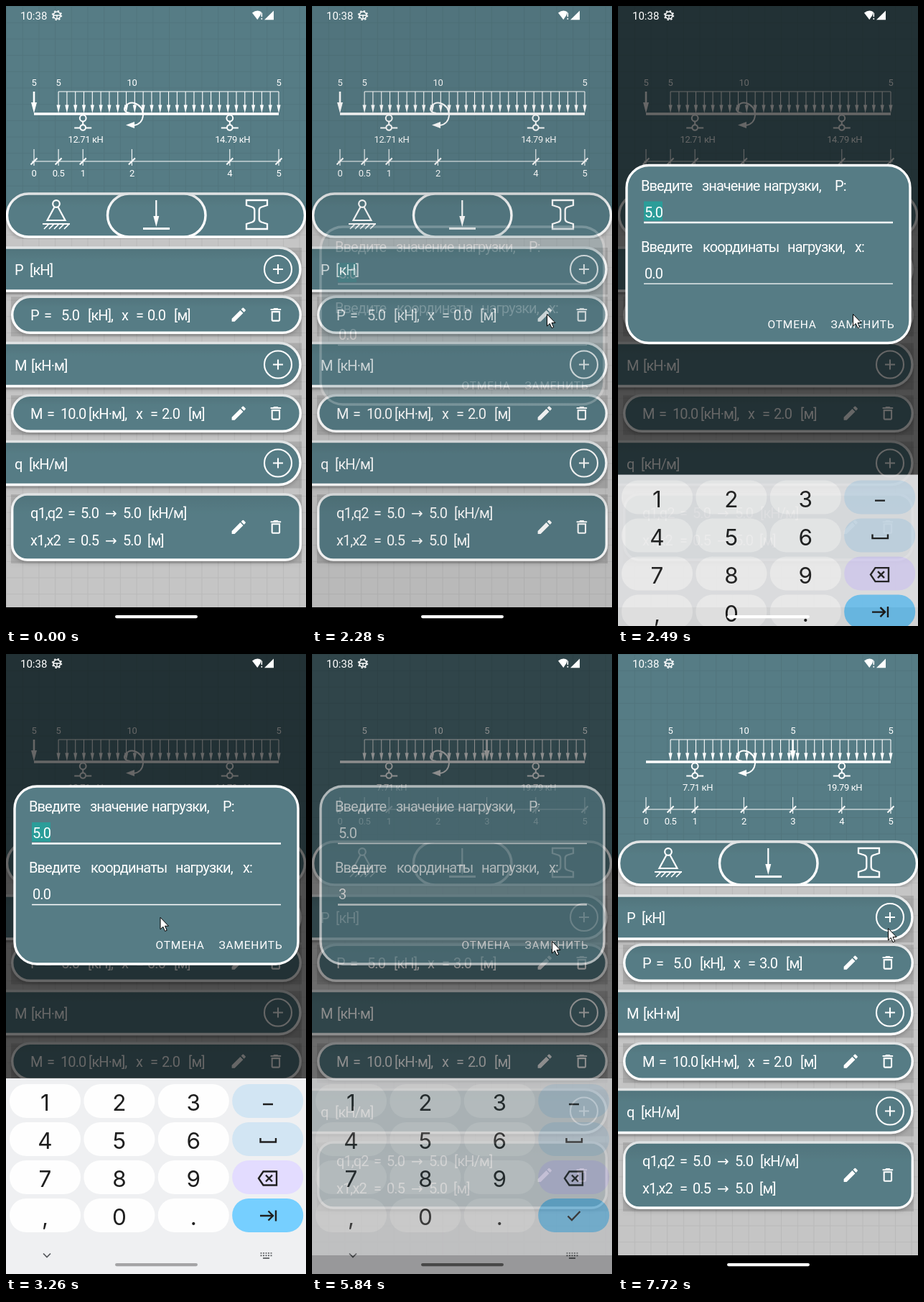
An HTML page for the animation above (8 s loop, 418x862 px).

```html
<!DOCTYPE html>
<html lang="ru">
<head>
<meta charset="utf-8">
<title>Beam load editor</title>
<style>
  html, body { margin: 0; width: 100%; height: 100%; overflow: hidden; background: #000; }
  svg { display: block; width: 100vw; height: 100vh; }
  text { font-family: Roboto, "Open Sans", "DejaVu Sans", sans-serif; fill: #fff; }
  .clock { font-size: 15px; }
  .row { font-size: 20px; letter-spacing: -.9px; }
  .small { font-size: 13px; letter-spacing: -.4px; text-anchor: middle; }
  .button { font-size: 15.5px; letter-spacing: .8px; }
  .digit { font-family: Inter, Roboto, sans-serif; font-size: 31.5px; text-anchor: middle; fill: #1f1f1f; }
  .line { fill: none; stroke: #fff; }
  .dark { fill: none; stroke: #1f1f1f; stroke-width: 2.4; }
</style>
</head>
<body>
<svg id="stage" viewBox="0 0 418 862" preserveAspectRatio="none"></svg>
<script>
const LOOP = 8000;
const TEAL = '#567c85';
const stage = document.getElementById('stage');
const list = (n, fn) => Array.from({ length: n }, (_, i) => fn(i)).join('');
const beamX = u => 39 + 68.2 * u;

const line = (d, w = 2) => `<path class="line" stroke-width="${w}" d="${d}"/>`;
const solid = d => `<path fill="#fff" d="${d}"/>`;
const ring = (x, y, r, w = 2) => `<circle class="line" cx="${x}" cy="${y}" r="${r}" stroke-width="${w}"/>`;
const text = (cls, x, y, s, id = '') => `<text class="${cls}" x="${x}" y="${y}" ${id && `id="${id}"`}>${s}</text>`;
const words = (y, s, xs) => s.split(' ').map((w, i) => text('row', xs[i], y, w)).join('');
const panel = (x, y, w, h, r) =>
  `<rect x="${x}" y="${y}" width="${w}" height="${h}" rx="${r}" fill="url(#face)" stroke="url(#rim)" stroke-width="3.4"/>`;
const shadow = (x, y, h) => `<rect x="${x}" y="${y}" width="${412 - x}" height="${h + 5}" fill="#000" opacity=".12"/>`;

// Beam drawing
const tick = u => {
  const x = beamX(u);
  return line(`M${x} 199V222`, 1.1) + line(`M${x - 4.5} 220.5L${x + 4.5} 211.5`, 2) + text('small', x, 237, u);
};
const loadArrow = i => {
  const x = 73.1 + i * 306.9 / 26;
  return line(`M${x} 119V140`, 1.1) + solid(`M${x - 2.6} 137.5h5.2L${x} 149z`);
};
const support = x => ring(x, 156, 4.4) + line(`M${x} 160.5V165`) + ring(x, 169, 3.8) +
  line(`M${x - 12} 169.5h8M${x + 4} 169.5h8`, 2.2);
const beam = `
  ${line('M73.1 119H380', 1.2)}${list(27, loadArrow)}
  ${line('M39 150H380', 3.6)}
  ${support(beamX(1))}${support(beamX(4))}
  ${line('M173 149Q162 147 166 140Q171 133 179 135Q191 139 191 152Q190 164 178 166', 1.9)}
  ${solid('M167 165.5L179 161V170z')}
  ${text('small', 73, 111, 5)}${text('small', 175.4, 111, 10)}${text('small', 380, 111, 5)}
  <g id="force">${line('M0 119V140', 2.6)}${solid('M-4 134h8L0 149z')}${text('small', 0, 111, 5)}</g>
  ${text('small', 111, 190, '', 'leftR')}${text('small', 315.7, 190, '', 'rightR')}
  ${line('M36 216H383', 1.2)}${[0, .5, 1, 2, 4, 5].map(tick).join('')}
  <g id="tick3">${tick(3)}</g>`;

// Tabs and lists
const tabs = `
  ${panel(1.5, 261, 415, 60, 30)}${panel(141.5, 261, 136.5, 60, 30)}
  ${ring(70, 275, 4.8, 2.2)}
  ${line('M67.5 279.5L57.5 298H82.5L72.5 279.5', 2.2)}${line('M51 303H89', 2.2)}
  ${line([0, 1, 2, 3, 4].map(i => `M${60 + i * 7} 303l-7 7`).join(''), 1.7)}
  ${line('M209.3 270V298', 2.2)}${solid('M205.3 292h8L209.3 307z')}${line('M191 309.5H228', 2.8)}
  ${line('M335 270H364V277L356 279.5Q352.7 280.5 352.7 284V296Q352.7 299.5 356 300.5L364 303V310H335V303L343 300.5Q346.3 299.5 346.3 296V284Q346.3 280.5 343 279.5L335 277Z', 2.3)}`;
const section = (y, s, x2) => shadow(0, y, 60) + panel(-40, y, 450, 60, 30) + words(y + 38, s, [12, x2]) +
  ring(379, y + 30, 19, 2.1) + line(`M372 ${y + 30}h14M379 ${y + 23}v14`, 2.1);
const icons = y => `
  <path fill="#fff" transform="translate(311.4 ${y - 13}) scale(1.07)" d="M3 17.25V21h3.75L17.81 9.94l-3.75-3.75zM20.71 7.04a1 1 0 0 0 0-1.41l-2.34-2.34a1 1 0 0 0-1.41 0l-1.83 1.83 3.75 3.75z"/>
  <path fill="#fff" fill-rule="evenodd" transform="translate(363.4 ${y - 12.5}) scale(1.04)" d="M6 19a2 2 0 0 0 2 2h8a2 2 0 0 0 2-2V7H6zM8 9h8v10H8zM15.5 4l-1-1h-5l-1 1H5v2h14V4z"/>`;
const card = (y, h, r) => shadow(7, y, h) + panel(8.7, y, 401.6, h, r) + icons(y + h / 2);
const lists = `
  ${section(336, 'P [кН]', 33)}
  ${card(404.3, 50, 25)}
  ${words(437, 'P = 5.0 [кН], x =', [34, 53, 77, 114, 161, 181])}
  ${text('row', 197, 437, '', 'pointX')}${text('row', 234, 437, '[м]')}
  ${section(468.5, 'M [кН·м]', 35)}
  ${card(541.3, 50, 25)}
  ${words(574, 'M = 10.0 [кН·м], x = 2.0 [м]', [34, 57, 76, 115, 181, 201, 217, 254])}
  ${section(605.5, 'q [кН/м]', 32)}
  ${card(679, 91, 21)}
  ${words(712, 'q1,q2 = 5.0 → 5.0 [кН/м]', [34, 86, 104, 138, 163, 198])}
  ${words(750, 'x1,x2 = 0.5 → 5.0 [м]', [34, 86, 104, 138, 163, 197])}`;

const statusBar = `
  ${text('clock', 20, 18.6, '10:38')}
  ${ring(71, 13, 5, 1.5)}
  <circle class="line" cx="71" cy="13" r="6.4" stroke-width="1.5" stroke-dasharray="2.4 2.63"/>
  ${line('M66 13H76M71 13V18', 1.4)}
  ${solid('M343 9.5Q350 4 356 8.5L354 13.5L350.3 19z')}${line('M356.3 9.5V15M356.3 16.8V18.8', 1.6)}
  ${solid('M373 6.5V19.3H360z')}`;

// Dialog
const field = (n, y) => `
  <rect id="sel${n}" x="36" y="${y}" width="26" height="27" fill="#2b9d99"/>
  ${text('row', 37, y + 22, '5.0', 'val' + n)}
  <path id="under${n}" class="line" d="M36 ${y + 29.5}H383"/>`;
const dialog = `
  <rect x="12" y="184" width="395" height="247" rx="31" fill="${TEAL}" stroke="#fff" stroke-width="3.4"/>
  ${words(219, 'Введите значение нагрузки, P:', [32, 117, 203, 302])}
  ${field(1, 234)}
  ${words(304, 'Введите координаты нагрузки, x:', [32, 118, 236, 330])}
  ${field(2, 319)}
  ${text('button', 208.5, 410, 'ОТМЕНА')}${text('button', 296.5, 410, 'ЗАМЕНИТЬ')}`;

// Keyboard
const special = ['#d2e5f3', '#d2e5f3', '#e3dcff', '#76cfff'];
const caps = ['123', '456', '789', ',0.'];
const key = i => {
  const col = i % 4, row = i >> 2;
  const x = 5 + col * 103.4, y = 598 + row * 53;
  const box = `<rect id="key${i}" x="${x}" y="${y}" width="99" height="47" rx="23" fill="${col < 3 ? '#fefefe' : special[row]}"/>`;
  return box + (col < 3 ? text('digit', x + 49.5, y + 37, caps[row][col]) : '');
};
const keyboard = `
  <rect y="590" width="418" height="272" fill="#eff0f2"/>
  ${list(16, key)}
  <path class="dark" d="M358 626H372M354.5 673V678.5H376V673"/>
  <path class="dark" stroke-width="2" d="M358.5 719.5H377V738.5H358.5L352 729zM362 724.5l9 9m0-9l-9 9"/>
  <path id="next" class="dark" d="M354 781H371M365.5 774.5L372 781L365.5 787.5M376 773.5V788.5"/>
  <path id="done" class="dark" d="M356.5 781.5L362 787L373.5 775"/>
  <path fill="none" stroke="#55585c" stroke-width="1.7" d="M52 833.5L57 838.5L62 833.5"/>
  <path fill="none" stroke="#55585c" stroke-width="1.7" stroke-dasharray="2 1.5" d="M354.5 833H370.5M354.5 836.3H370.5"/>
  <path fill="none" stroke="#55585c" stroke-width="1.7" d="M358 840H367"/>`;

stage.innerHTML = `
  <defs>
    <linearGradient id="face" x2="0" y2="1">
      <stop stop-color="#50747c"/><stop offset=".3" stop-color="${TEAL}"/><stop offset="1" stop-color="${TEAL}"/>
    </linearGradient>
    <linearGradient id="rim" x2="0" y2="1">
      <stop stop-color="#dfe2e3"/><stop offset=".35" stop-color="#fff"/>
    </linearGradient>
    <pattern id="grid" width="22.7" height="22.7" patternUnits="userSpaceOnUse">
      <path d="M.5 0V22.7M0 .5H22.7" stroke="#000" stroke-opacity=".06"/>
    </pattern>
    <filter id="shade" x="-5%" y="-5%" width="110%" height="110%">
      <feDropShadow dx="0" dy="3" stdDeviation="2.5" flood-color="#000" flood-opacity=".2"/>
    </filter>
  </defs>
  <rect width="418" height="836" fill="#c5c5c5"/>
  <rect width="418" height="290" fill="${TEAL}"/>
  <rect width="418" height="836" fill="url(#grid)"/>
  ${beam}
  <g filter="url(#shade)">${tabs}</g>
  <g filter="url(#shade)">${lists}</g>
  <rect id="dim" width="418" height="836"/>
  <rect y="836" width="418" height="26"/>
  ${statusBar}
  <g id="dialog">${dialog}</g>
  <g id="keyboard">${keyboard}</g>
  <rect id="pill" x="152" y="847" width="115" height="4.2" rx="2.1"/>
  <path id="cursor" fill="#fff" stroke="#000" stroke-width="1" d="M.5 .5V17L4.3 13.5L7 19.7L9.7 18.5L7 12.5H12z"/>`;

const el = {};
stage.querySelectorAll('[id]').forEach(n => el[n.id] = n);
const set = (id, name, v) => el[id].setAttribute(name, v);
const show = (id, on) => set(id, 'visibility', on ? 'visible' : 'hidden');
const put = (id, s) => { if (el[id].textContent !== s) el[id].textContent = s; };
const clamp = v => Math.min(1, Math.max(0, v));

const OPEN = 2276, CLOSE = 5836, FOCUS = 3850, TYPED = 4935;
// time, x, y of the pointer tip
const path = [
  [950, 420, 432], [1400, 327, 428], [3050, 327, 428], [3420, 141, 325], [3620, 139, 331],
  [4310, 139, 331], [4580, 252, 619], [4700, 253, 609], [5040, 253, 609], [5510, 334, 399],
  [6150, 334, 399], [6590, 215, 432], [6810, 215, 432], [7450, 388, 430], [7600, 382, 421],
  [7720, 376, 381]
];

function pointer(t) {
  const i = path.findIndex(p => p[0] > t);
  if (i < 0) return path[path.length - 1].slice(1);
  if (i === 0) return path[0].slice(1);
  const [t0, x0, y0] = path[i - 1], [t1, x1, y1] = path[i];
  const p = (t - t0) / (t1 - t0), e = p * p * (3 - 2 * p);
  return [x0 + (x1 - x0) * e, y0 + (y1 - y0) * e];
}

const riseStart = 2400;
const rise = t => 246 * Math.pow(1 - clamp((t - riseStart) / 285), 3.6);

function pillColor(t) {
  if (t < 2915 || t >= 6815) return '#fff';
  if (t < 3600) return '#a4a4a6';
  return t < 5900 ? '#484848' : '#a4a4a6';
}

function draw(t) {
  const closing = t >= CLOSE;
  const opened = t >= OPEN;

  put('leftR', closing ? '7.71 кН' : '12.71 кН');
  put('rightR', closing ? '19.79 кН' : '14.79 кН');
  put('pointX', closing ? '3.0' : '0.0');
  set('force', 'transform', `translate(${beamX(closing ? 3 : 0)} 0)`);
  show('tick3', closing);

  const fade = closing ? clamp((5930 - t) / 145) : opened ? clamp((t - 2250) / 135) : 0;
  const dim = closing ? clamp(1 - (t - 5800) / 160) : opened ? clamp((t - 2265) / 150) : 0;
  const keys = closing ? clamp((5930 - t) / 140) : clamp((t - riseStart) / 104);
  set('dim', 'opacity', .6 * dim);
  set('dialog', 'opacity', fade);
  set('dialog', 'transform', `translate(0 ${rise(t - 11) / 2})`);
  set('keyboard', 'opacity', keys);
  set('keyboard', 'transform', `translate(0 ${rise(t)})`);

  const second = t >= FOCUS, typed = t >= TYPED;
  set('sel1', 'opacity', second ? 0 : 1);
  set('sel2', 'opacity', second && !typed ? 1 : 0);
  set('under1', 'stroke-width', second ? 1.3 : 2.5);
  set('under2', 'stroke-width', second ? 2.5 : 1.3);
  put('val2', typed ? '3' : '0.0');
  set('next', 'opacity', second ? 0 : 1);
  set('done', 'opacity', second ? 1 : 0);
  set('key2', 'fill', t >= 4846 && t < 5000 ? '#d2e5f3' : '#fefefe');

  set('pill', 'fill', pillColor(t));
  show('cursor', t >= 955);
  set('cursor', 'transform', `translate(${pointer(t).join(' ')})`);
}

const start = performance.now();
function tickFrame(now) {
  draw(Math.max(0, now - start) % LOOP);
  requestAnimationFrame(tickFrame);
}
draw(0);
requestAnimationFrame(tickFrame);
</script>
</body>
</html>
```
